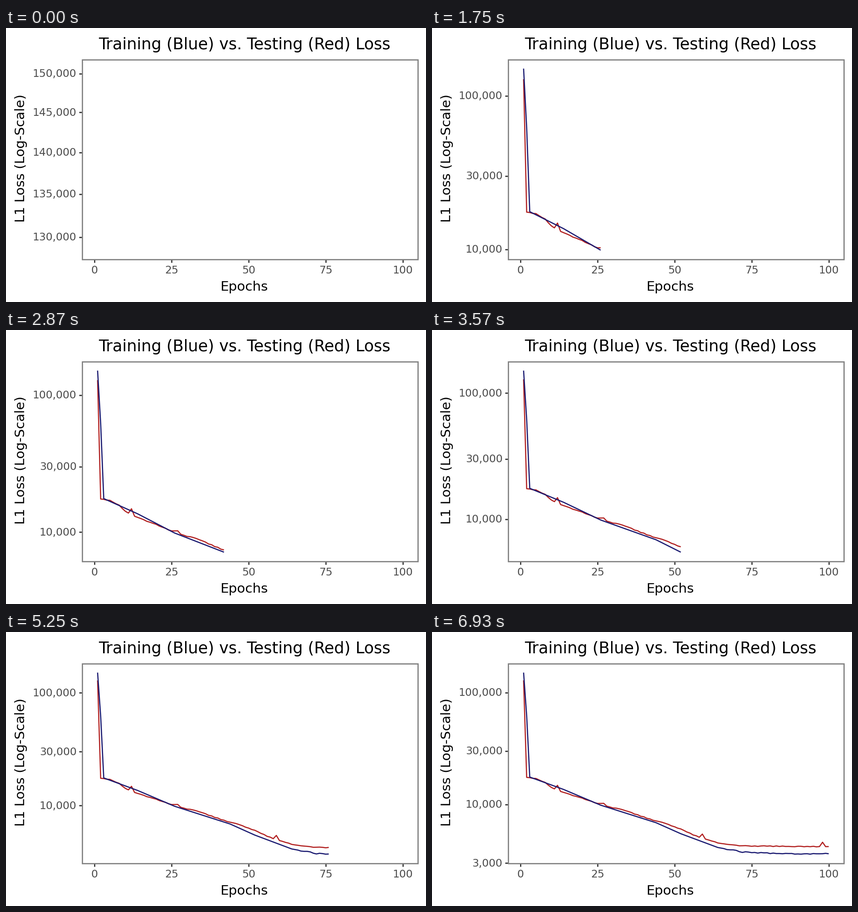
Animation of 926x605 px, one loop 7 s. Source, as a matplotlib script:

```python
import matplotlib.pyplot as plt
import numpy as np
from matplotlib.animation import FuncAnimation
from matplotlib.patches import Rectangle

W, H, DPI = 926, 605, 192
LEFT, RIGHT, TOP, BOTTOM = 168.3, 908.3, 69.6, 510.6
EPOCHS = 100
TICK = 7.3
INK, FAINT, BORDER = "#333333", "#4d4d4d", "#7f7f7f"

# Bends of each curve: epoch -> thousandths of a decade above 10,000.
TRAIN = {1: 1178, 2: 792, 3: 245, 14: 134, 26: -6, 44: -163, 52: -261,
         64: -384, 72: -424, 84: -438, 100: -441}
TEST = {1: 1109, 2: 242, 5: 231, 8: 196, 10: 154, 13: 114, 18: 74, 25: 8,
        27: 10, 28: -16, 34: -54, 42: -132, 47: -170, 52: -221, 58: -294,
        64: -343, 71: -370, 100: -377}
SPIKES = {12: 44, 59: 39, 98: 37}


def log_loss(bends, noise, start, spikes={}):
    """Straight runs between the bends, with jitter after the start epoch."""
    level = np.interp(epochs, list(bends), list(bends.values()))
    level += np.where(epochs > start, rng.uniform(-noise, noise, EPOCHS), 0)
    for epoch, height in spikes.items():
        level[epoch - 1] += height
    return 4 + level / 1000


def to_x(epoch):
    pad = 0.05 * (EPOCHS - 1)
    return LEFT + (epoch - 1 + pad) / (EPOCHS - 1 + 2 * pad) * (RIGHT - LEFT)


def breaks(lo, hi):
    """Round values on a log axis, at least three inside the limits."""
    for steps in ((1, 3), (1, 3, 5)):
        values = np.outer(10.0 ** np.arange(3, 6), steps).ravel()
        if np.sum((values >= 10**lo) & (values <= 10**hi)) >= 3:
            return values
    return np.arange(130000, 150001, 5000)


rng = np.random.default_rng(4)
epochs = np.arange(1, EPOCHS + 1)
train = log_loss(TRAIN, 5, 66)
test = log_loss(TEST, 3, 2, SPIKES)

plt.rcParams["font.family"] = "DejaVu Sans"
fig = plt.figure(figsize=(W / DPI, H / DPI), dpi=DPI, facecolor="white")
ax = fig.add_axes([0, 0, 1, 1])
ax.set_xlim(0, W)
ax.set_ylim(H, 0)
ax.axis("off")


def label(x, y, text, size, color="black", **kw):
    kw = {"ha": "center", "va": "baseline", **kw}
    return ax.text(x, y, text, fontsize=size, color=color, **kw)


def tick_line(xs, ys):
    return ax.plot(xs, ys, color=INK, lw=1, solid_capstyle="butt", zorder=1)[0]


def curve(color):
    return ax.plot([], [], color=color, lw=0.95, solid_capstyle="butt",
                   solid_joinstyle="round", zorder=2)[0]


label(525.8, 46.5, "Training (Blue) vs. Testing (Red) Loss", 13.17)
label(524.8, 580, "Epochs", 11)
label(41, 287.5, "L1 Loss (Log-Scale)", 11, rotation=90,
      rotation_mode="anchor")
for e in range(0, 101, 25):
    tick_line([to_x(e)] * 2, [BOTTOM, BOTTOM + TICK])
    label(to_x(e), 542, str(e), 8.8, FAINT)
ax.add_patch(Rectangle((LEFT, TOP), RIGHT - LEFT, BOTTOM - TOP, fill=False,
                       ec=BORDER, lw=1, zorder=3))

test_line, train_line = curve("#b22222"), curve("#191970")
y_ticks = [(tick_line([LEFT - TICK, LEFT], [0, 0]),
            label(155.5, 0, "", 8.8, FAINT, ha="right")) for _ in range(6)]


def draw(i):
    n = i + 1
    lo = min(train[:n].min(), test[:n].min())
    hi = max(train[:n].max(), test[:n].max())
    pad = 0.05 * (hi - lo)

    def to_y(level):
        return BOTTOM - (level - lo + pad) / (hi - lo + 2 * pad) * (BOTTOM - TOP)

    for line, data in ((test_line, test), (train_line, train)):
        line.set_data(to_x(epochs[:n]), to_y(data[:n]))
        line.set_visible(n > 1)

    shown = [v for v in breaks(lo, hi) if lo - pad <= np.log10(v) <= hi + pad]
    for k, (mark, text) in enumerate(y_ticks):
        on = k < len(shown)
        mark.set_visible(on)
        text.set_visible(on)
        if on:
            y = to_y(np.log10(shown[k]))
            mark.set_ydata([y, y])
            text.set_y(y + 7.5)
            text.set_text(f"{shown[k]:,.0f}")
    return []


anim = FuncAnimation(fig, draw, frames=EPOCHS, interval=70, repeat=True,
                     repeat_delay=0)
plt.show()
```
